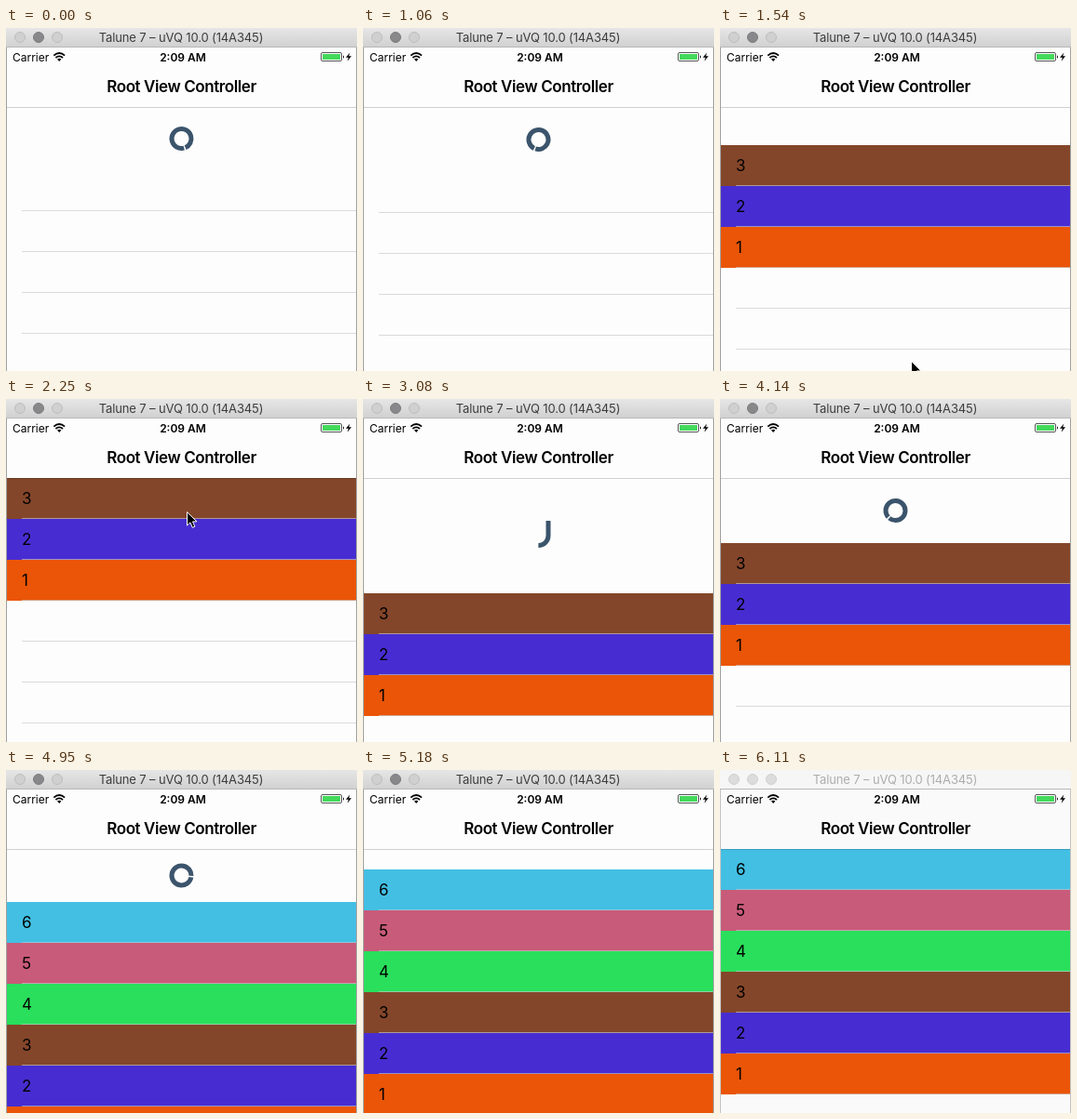
Animation, 377 px wide and 369 px high, one loop 6160 ms. Source, as an HTML page:

```html
<!DOCTYPE html>
<html lang="en">
<head>
<meta charset="utf-8">
<title>Pull to refresh</title>
<style>
  html, body { margin: 0; width: 100%; height: 100%; overflow: hidden; }
  svg { display: block; width: 377px; height: 369px; font-family: Inter, "Open Sans", sans-serif; }
  #bg, #nav { fill: #fdfdfd; }
  #bar { fill: url(#metal); }
  #bar ~ circle { fill: #d0d0d0; stroke: #bdbdbd; }
  #bar ~ .dark { fill: #88888b; stroke: #7c7c7f; }
  #title { font-size: 13px; letter-spacing: -.13px; fill: #3c3c3c; }
  #frame { fill: none; stroke: #a0a0a0; }
  .idle #bg, .idle #nav { fill: #fafafa; }
  .idle #bar { fill: #f6f6f6; }
  .idle #bar ~ circle { fill: #dcdcdc; stroke: #d0d0d0; }
  .idle #title { fill: #adadad; }
  .idle #frame { stroke: #c4c4c4; }
  #rows text { font-size: 17px; }
  #ring { fill: none; stroke: #3b546c; stroke-width: 5; }
</style>
</head>
<body>
<svg id="stage" viewBox="0 0 377 369">
  <defs>
    <linearGradient id="metal" x2="0" y2="1">
      <stop stop-color="#e6e6e6"/><stop offset="1" stop-color="#d1d1d1"/>
    </linearGradient>
  </defs>
  <rect id="bg" width="377" height="369"/>
  <g id="rows"></g>
  <path id="ring" d="M10.5-60V0A10.5 10.5 0 0 1-10.5 0A10.5 10.5 0 0 1 10.5 0"/>
  <rect id="nav" y="20" width="377" height="65"/>
  <rect y="85" width="377" height="1" fill="#000" opacity=".18"/>
  <text x="188.5" y="69" font-size="17" font-weight="600" letter-spacing="-.41" text-anchor="middle">Root View Controller</text>

  <g font-size="12">
    <text x="7" y="35.5">Carrier</text>
    <text x="190" y="35.5" font-weight="600" text-anchor="middle">2:09 AM</text>
  </g>
  <g fill="none" stroke="#000" stroke-width="1.8">
    <path d="M51.3 29.6Q57.2 24.4 63.1 29.6M53.4 32Q57.2 28.7 61 32"/>
    <path d="M57.2 36L55 33.6Q57.2 31.7 59.4 33.6Z" fill="#000" stroke="none"/>
  </g>
  <rect x="338.5" y="26.5" width="22" height="9" rx="1.5" fill="#fff" stroke="#555"/>
  <rect x="340" y="28" width="19" height="6" fill="#43d95b"/>
  <path d="M362 29.2Q364 31 362 32.8Z"/>
  <path d="M369.4 26.5L365 31.8H367.8L366.6 35.8L371 30.3H368.2Z"/>

  <rect id="frame" x=".5" y="10.5" width="376" height="370"/>
  <rect id="bar" width="377" height="20"/>
  <rect y="20" width="377" height="1" fill="#b8b8b8"/>
  <circle cx="15" cy="10" r="5.5"/>
  <circle class="dark" cx="35" cy="10" r="5.5"/>
  <circle cx="55" cy="10" r="5.5"/>
  <text id="title" x="188" y="15" text-anchor="middle">Talune 7 – uVQ 10.0 (14A345)</text>

  <path id="cursor" d="M.5 .5V15L3.9 11.9L6.3 17.3L8.9 16.2L6.5 10.9H11Z" stroke="#fff"/>
</svg>
<script>
const LOOP = 6160, TICK = 117.7, TOP = 85, ROW = 44, REST = 70;
const colors = ["#ea5507", "#472dd1", "#84462a", "#29df5c", "#c85b79", "#42bfe3"];
const closing = [70, 57, 41, 22, 4, 0];   // header heights while it retracts
const settling = [120, 88, 74];           // and after the drag is let go
const $ = id => document.getElementById(id);
const clamp = x => Math.min(1, Math.max(0, x));

$("rows").innerHTML = Array.from({ length: 8 }, (_, i) => `
  <g transform="translate(0 ${i * ROW})">
    <rect x="1" width="375" height="${ROW}"/>
    <rect x="17" y="${ROW - 1}" width="359" height="1" fill="#c8c7cc" opacity=".65"/>
    <text x="17" y="28"></text>
  </g>`).join("");
const rows = [...$("rows").children];

function drag(n) {
  return 313 * (1 - Math.cos(Math.PI * clamp((n - 21.7) / 5.5))) / 2;
}

function rubberBand(d) {
  return 667 * .55 * d / (667 + .55 * d);
}

// Header height at tick n; both refreshes close the same way, 30 ticks apart
function offset(n) {
  if (n < 1) return 68;
  if (n < 11) return REST;
  if (n < 22) return closing[n - 11] ?? 0;
  if (n < 28) return rubberBand(drag(n));
  if (n < 41) return settling[n - 28] ?? REST;
  return closing[n - 41] ?? 0;
}

function drawRing(n, o) {
  const pulling = n >= 22 && n < 28;
  const loading = n < 13 && o > 50 || n >= 28 && n < 43 && o > 50;
  const ring = $("ring");
  ring.style.display = pulling || loading ? "" : "none";
  // The stroke slides down the straight part and bends round the circle
  const u = o / 124;
  const tail = pulling ? -49 + 33 * u : 0;
  const length = pulling ? 16 + 16.5 * u : 64;
  const angle = pulling ? 0 : 75 + 84.6 * (n < 28 ? n : n - 30);
  ring.setAttribute("stroke-dasharray", `0 ${60 + tail} ${length} 999`);
  ring.setAttribute("transform", `translate(188.5 ${TOP + o / 2}) rotate(${angle})`);
}

function drawCursor(n) {
  const left = Math.pow(1 - Math.min(1, (n - 13) / 6), 1.8);
  const x = 194 + 11 * left, y = 121 + 237 * left + drag(n);
  $("cursor").setAttribute("transform", `translate(${x} ${y})`);
}

function draw(t) {
  const n = Math.floor((t + 5) / TICK);
  const o = Math.round(offset(n));
  const count = n < 11 ? 0 : n < 41 ? 3 : 6;
  $("stage").classList.toggle("idle", t >= 6110);
  $("rows").setAttribute("transform", `translate(0 ${TOP + o})`);
  rows.forEach((row, i) => {
    const label = count - i;
    row.children[0].setAttribute("fill", colors[label - 1] ?? "none");
    row.children[2].textContent = label > 0 ? label : "";
  });
  drawRing(n, o);
  drawCursor(n);
}

const start = performance.now();
function loop() {
  draw((performance.now() - start) % LOOP);
  requestAnimationFrame(loop);
}
loop();
</script>
</body>
</html>
```
